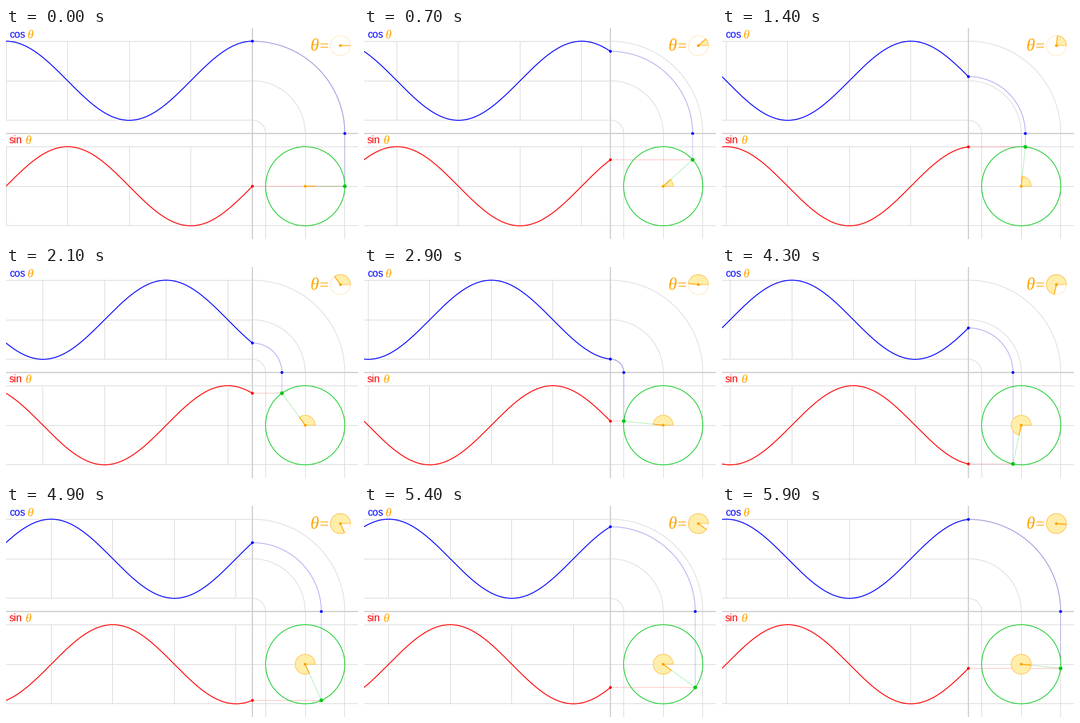
Recreate the animation shown at these times as a matplotlib script. Size 540 px wide and 324 px high, loop 6 s.

```python
import numpy as np
import matplotlib.pyplot as plt
from matplotlib.animation import FuncAnimation
from matplotlib.patches import Circle, Wedge

W, H = 540, 324
FRAMES, INTERVAL = 60, 100
OX, OY = 378, 162            # axis crossing; also the wave period in x
CX, CY, R = 459, 243, 60.75  # unit circle
MID = CX - OX                # distance from the crossing to the circle's centre
DIAL = (513, 27)
DIAL_R = 15.3

GRID, AXIS = "#d9d9d9", "#d2d2d2"
BLUE, RED, GREEN, ORANGE = "#0000ff", "#ff0000", "#00c814", "#ffa500"
FILL, EDGE, PALE = "#ffeeaa", "#ffc04c", "#ffe6bd"

# At 72 dpi one point equals one pixel.
fig = plt.figure(figsize=(W / 72, H / 72), dpi=72, facecolor="white")
ax = fig.add_axes([0, 0, 1, 1])
ax.set_xlim(0, W)
ax.set_ylim(H, 0)
ax.axis("off")


def line(xs, ys, color, lw=1.0, z=1, alpha=None):
    artist, = ax.plot(xs, ys, color=color, lw=lw, zorder=z, alpha=alpha,
                      solid_capstyle="butt", snap=False)
    return artist


def dot(x, y, radius, color, z=10):
    return ax.add_patch(Circle((x, y), radius, fc=color, ec="none", zorder=z))


def label(x, y, text, size, color, font, style="normal"):
    ax.text(x, y, text, fontsize=size, color=color, family=font,
            style=style, va="baseline", ha="left", zorder=12)


def crisp(v):
    return np.floor(v) + 0.5


def quarter(radius):
    a = np.linspace(0, np.pi / 2, 90)
    return OX + radius * np.sin(a), OY - radius * np.cos(a)


# Static grid, axes and circle
for d in (-R, 0, R):
    line([0, OX], [crisp(OY - MID + d)] * 2, GRID)
    line([0, W], [crisp(CY + d)] * 2, GRID)
    line([crisp(CX + d)] * 2, [OY, H], GRID)
    line(*quarter(MID + d), GRID)
line([OX, OX], [0, H], AXIS, 2, 2)
line([0, W], [OY, OY], AXIS, 2, 2)
ax.add_patch(Circle((CX, CY), R, fill=False, ec=GREEN, lw=1.1, zorder=5))
ax.add_patch(Circle(DIAL, DIAL_R, fill=False, ec=PALE, lw=1, zorder=5))

# Labels
label(5, 15, "cos", 15.8, BLUE, "Liberation Sans")
label(5, 177, "sin", 15.8, RED, "Liberation Sans")
label(32.5, 15.6, "θ", 19, ORANGE, "Liberation Serif", "italic")
label(29.5, 177.6, "θ", 19, ORANGE, "Liberation Serif", "italic")
label(467, 35, "θ", 27, ORANGE, "Liberation Serif", "italic")
for y in (24.5, 29.5):
    line([482.5, 494], [y, y], ORANGE, 1.2, 12)

# Moving parts
ticks = [(line([], [], GRID), line([], [], GRID)) for _ in range(5)]
xs = np.linspace(0, OX, 379)
cos_wave = line([], [], BLUE, 1.4, 6)
sin_wave = line([], [], RED, 1.4, 6)
cos_arc = line([], [], "#0000dc", 1.1, 4, 0.35)
cos_drop = line([], [], "#0000dc", 1, 4, 0.25)
sin_link = line([], [], RED, 1, 4, 0.25)
radius_line = line([], [], GREEN, 1, 4, 0.32)

dials = []
for centre in ((CX, CY), DIAL):
    wedge = ax.add_patch(Wedge(centre, DIAL_R, -1, 0, fc=FILL, ec=EDGE,
                               lw=1, zorder=7))
    hand = line([], [], ORANGE, 1.2, 8)
    dot(*centre, 2.2, ORANGE)
    dials.append((centre, wedge, hand))

cos_dot = dot(OX, OY, 2.2, BLUE)
arc_dot = dot(OX, OY, 2.2, BLUE)
sin_dot = dot(OX, OY, 2.2, RED)
tip_dot = dot(CX, CY, 2.9, GREEN, 11)


def update(k):
    theta = 2 * np.pi * k / FRAMES
    c, s = np.cos(theta), np.sin(theta)
    reach = MID + R * c
    x, y = OX + reach, CY - R * s

    phase = theta - 2 * np.pi * (OX - xs) / OX
    cos_wave.set_data(xs, OY - MID - R * np.cos(phase))
    sin_wave.set_data(xs, CY - R * np.sin(phase))

    first = OX - (OX * k / FRAMES) % (OX / 4)
    for i, pair in enumerate(ticks):
        tx = crisp(first - i * OX / 4)
        for tick, mid in zip(pair, (OY - MID, CY)):
            tick.set_data([tx, tx], [mid - R, mid + R])

    cos_arc.set_data(*quarter(reach))
    cos_drop.set_data([x, x], [OY, y])
    sin_link.set_data([OX, x], [y, y])
    radius_line.set_data([CX, x], [CY, y])

    for (dx, dy), wedge, hand in dials:
        wedge.set_visible(k > 0)
        wedge.set_theta1(-np.degrees(theta))
        hand.set_data([dx, dx + DIAL_R * c], [dy, dy - DIAL_R * s])

    cos_dot.center = (OX, OY - reach)
    arc_dot.center = (x, OY)
    sin_dot.center = (OX, y)
    tip_dot.center = (x, y)
    return []


anim = FuncAnimation(fig, update, frames=FRAMES, init_func=lambda: update(0),
                     interval=INTERVAL, repeat=True, repeat_delay=0)
plt.show()
```
